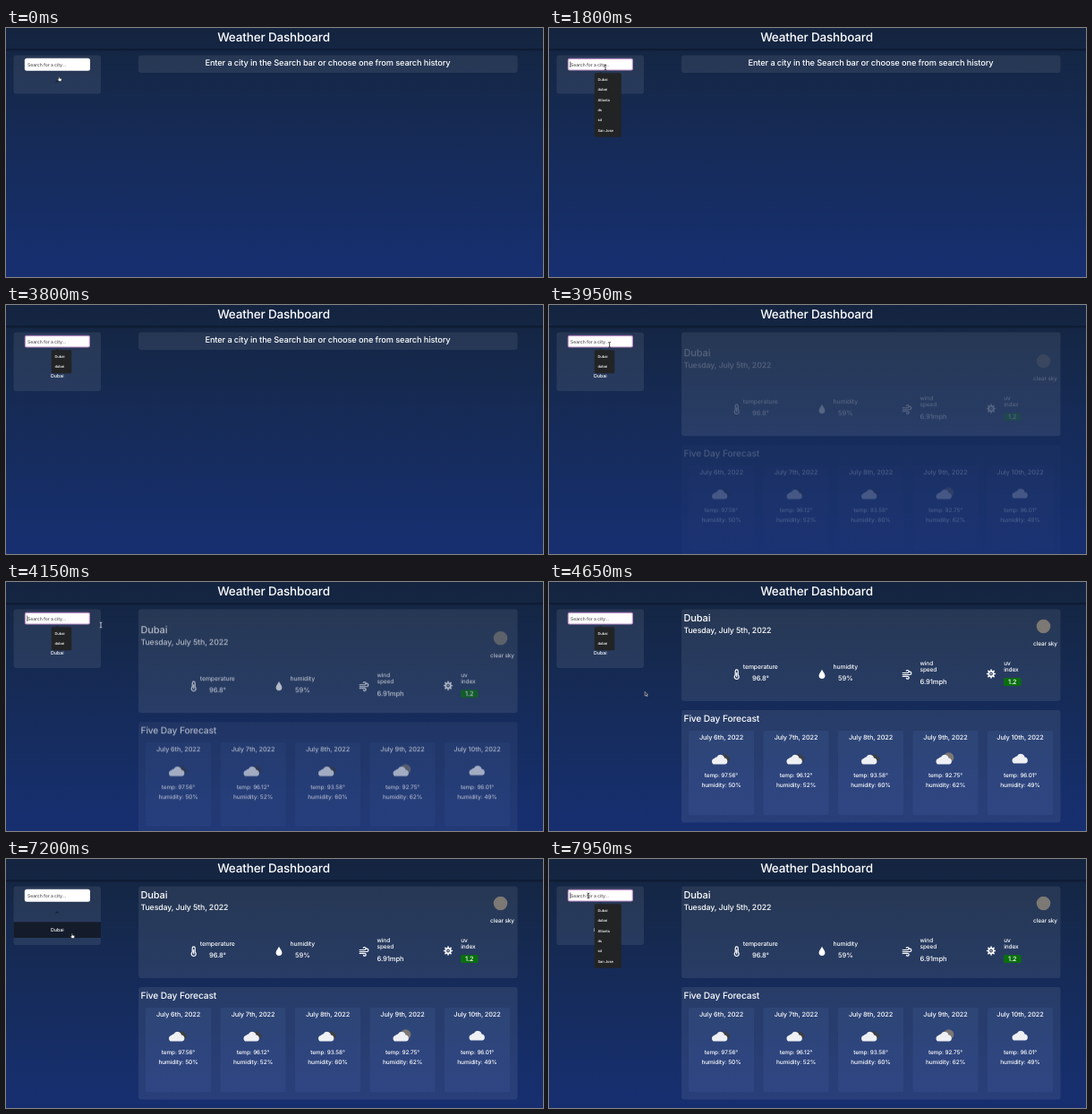
Write an HTML page that moves like this. It is 600 px wide and 278 px high and loops after 8000 ms.

```html
<!DOCTYPE html>
<html lang="en">
<head>
<meta charset="utf-8">
<title>Weather Dashboard</title>
<style>
html, body { margin: 0; width: 100%; height: 100%; overflow: hidden; background: #14264a; }
svg { display: block; width: 100vw; height: 100vh; }
text {
  font: 500 1px Inter, "Open Sans", sans-serif; letter-spacing: -.012em;
  fill: #fff; text-rendering: geometricPrecision;
}
.panel { fill: #fff; fill-opacity: .08; }
.card { fill: #6c90e0; fill-opacity: .09; }
</style>
</head>
<body>
<svg id="stage" viewBox="0 0 600 278" preserveAspectRatio="none"></svg>
<script>
const LOOP = 8000;
const text = (x, y, size, str, anchor = 'start', extra = '') =>
  `<text x="${x}" y="${y}" style="font-size:${size}px" text-anchor="${anchor}" ${extra}>${str}</text>`;
const mid = (x, y, size, str, extra) => text(x, y, size, str, 'middle', extra);
const rect = (x, y, w, h, r, attrs) =>
  `<rect x="${x}" y="${y}" width="${w}" height="${h}" rx="${r}" ${attrs}/>`;

const cloud = 'M-6 5.6A3.4 3.4 0 0 1 -6.3 -1.1A3 3 0 0 1 -3.6 -2.6A4.6 4.6 0 0 1 5 -1.6A3.7 3.7 0 0 1 5.8 5.6z';

const days = [
  ['6th', '97.56', 50, 'dark'], ['7th', '96.12', 52, 'dark'], ['8th', '93.58', 60, 'dark'],
  ['9th', '92.75', 62, 'sun'], ['10th', '96.01', 49, '']
];
const behind = {
  dark: `<path d="${cloud}" transform="translate(5 -1.9) scale(.75)" fill="#3d3f43"/>`,
  sun: '<circle cx="5" cy="-2" r="5.8" fill="#7c7874"/>',
  '': ''
};
const day = ([date, temp, hum, back], i) => {
  const x = 192.5 + i * 83.5;
  return rect(x - 36.5, 166, 73, 94, 2, 'class="card"') +
    mid(x, 176, 7.3, `July ${date}, 2022`) +
    `<g transform="translate(${x - (back ? 1.5 : 0)} ${back ? 198 : 197})">${behind[back]}<path d="${cloud}" fill="#eef0f4"/></g>` +
    mid(x, 218.3, 6.35, `temp: ${temp}°`) + mid(x, 228.5, 6.5, `humidity: ${hum}%`);
};

const rays = Array.from({ length: 8 }, (_, i) =>
  `<path d="M0 -3V-4.4" transform="rotate(${i * 45})"/>`).join('');
const icons = `<g fill="none" stroke="#fff" stroke-width="1.2" stroke-linecap="round">
  <g transform="translate(209.7 103)"><path d="M-1.5 1V-3.6a1.5 1.5 0 0 1 3 0V1a2.5 2.5 0 1 1 -3 0z"/>
    <path d="M0 -1.5V2.8"/></g>
  <path d="M305 97.8C306 100.5 308.4 102.2 308.4 104.6a3.4 3.4 0 0 1 -6.8 0C301.6 102.2 304 100.5 305 97.8z" fill="#fff" stroke="none"/>
  <g transform="translate(400 103)"><path d="M-4.8 -1.5H.6a1.5 1.5 0 1 0 -1.4 -2.2M-4.8 .5H3.2a1.7 1.7 0 1 0 -1.5 -2.6M-4.8 2.4H.8a1.4 1.4 0 1 1 -1.3 2"/></g>
  <g transform="translate(494 102.5)" stroke-width="1.6"><circle r="2.7"/>${rays}<circle r=".8" fill="#fff" stroke="none"/></g>
</g>`;

const weather = text(150.5, 43.6, 11, 'Dubai') + text(150.5, 56.6, 8.75, 'Tuesday, July 5th, 2022') +
  '<circle cx="552.5" cy="49.5" r="7.8" fill="#7c7874"/>' + mid(554.5, 71.4, 6.4, 'clear sky') + icons +
  mid(236.3, 96.5, 6.8, 'temperature') + mid(236.5, 110, 7.5, '96.8°') +
  mid(331.3, 96.5, 6.8, 'humidity') + mid(331.3, 110, 7.5, '59%') +
  text(414.5, 93, 6.5, 'wind') + text(414.5, 100, 6.5, 'speed') + text(414.5, 113.7, 7.6, '6.91mph') +
  text(508.2, 93, 6.5, 'uv') + text(508.2, 100, 6.5, 'index') +
  rect(508, 107, 19.5, 9, 1.5, 'fill="#0a6e0f"') + mid(517.7, 114.1, 7.3, '1.2') +
  rect(148, 143, 423.5, 125.5, 3, 'class="panel"') +
  text(150.5, 156, 10.2, 'Five Day Forecast') + days.map(day).join('');

const stage = document.getElementById('stage');
stage.innerHTML = `<defs><linearGradient id="sky" x2="0" y2="1">
    <stop stop-color="#14243f"/><stop offset=".2" stop-color="#15284a"/><stop offset=".8" stop-color="#162e68"/><stop offset="1" stop-color="#172f70"/>
  </linearGradient></defs>` +
  rect(0, 0, 600, 278, 0, 'fill="url(#sky)"') +
  rect(0, 23.3, 600, 1.2, 0, 'fill="#0c172b"') + rect(0, 24.5, 600, 1.5, 0, 'fill="#0c172b" opacity=".3"') +
  mid(299, 14.5, 13.5, 'Weather Dashboard') +
  rect(148, 30.5, 423.5, 19.5, 3, 'id="main" class="panel"') +
  mid(359.5, 42.3, 9.24, 'Enter a city in the Search bar or choose one from search history', 'id="message"') +
  `<g id="weather">${weather}</g>` +
  rect(8.5, 30.5, 97.5, 43, 3, 'id="side" class="panel"') +
  rect(8.5, 70.3, 97.5, 17.7, 0, 'id="hover" fill="#141c2b"') +
  mid(57.3, 80.8, 5.3, 'Dubai', 'id="past"') +
  '<path d="M55.5 60.6L57.3 59L59.1 60.6" fill="none" stroke="#0e1626" stroke-width=".9"/>' +
  rect(20.8, 33.8, 73.2, 14, 2.5, 'id="box" fill="#fff"') +
  rect(21.4, 34.4, 72, 12.6, 1.5, 'id="ring" fill="#fff" stroke="#b98cc4" stroke-width="1.2"') +
  text(24, 42.5, 5.1, '', 'start', 'id="field"') +
  rect(23.5, 37.5, .7, 6.5, 0, 'id="caret" fill="#222"') +
  `<g id="list"></g>
  <g id="cursor">
    <path id="beam" d="M-1.3 -3Q0 -3 0 -2V2Q0 3 -1.3 3M1.3 -3Q0 -3 0 -2M0 2Q0 3 1.3 3" fill="none" stroke="#222" stroke-width=".8"/>
    <path id="arrow" d="M-1.4 -2.6V2L-.3 1.1L.5 2.7L1.2 2.4L.5 .9H1.9z" fill="#111" stroke="#fff" stroke-width=".5"/>
    <path id="hand" d="M-1.2 -2.6Q-.5 -3.1 -.2 -2.4V-.9L1.8 -.5Q2.4 -.3 2.2 .6L1.6 2.6H-.9L-2.4 .5Q-2.2 -.2 -1.2 .3z" fill="#fff" stroke="#111" stroke-width=".5"/>
  </g>`;

const el = Object.fromEntries([...stage.querySelectorAll('[id]')].map(e => [e.id, e]));
const set = (e, attrs) => { for (const k in attrs) e.setAttribute(k, attrs[k]); };
const show = (e, on) => { e.style.display = on ? '' : 'none'; };
const ramp = (t, a, b) => Math.min(1, Math.max(0, (t - a) / (b - a)));
const ease = p => p * p * (3 - 2 * p);

// time, x, y
const path = [
  [0, 60, 57], [150, 60, 57], [450, 63, 44], [3900, 63, 44], [4150, 106, 48], [4800, 109, 137],
  [5850, 109, 137], [6150, 100, 119], [6300, 100, 119], [6550, 92, 107], [6700, 92, 107],
  [6950, 74.5, 86], [7220, 74.5, 86], [7500, 62, 60], [7700, 44, 41], [LOOP, 44, 41]
];
const pointer = t => {
  const i = path.findIndex(p => p[0] > t);
  const [t0, x0, y0] = path[i - 1], [t1, x1, y1] = path[i];
  const p = ease(ramp(t, t0, t1));
  return [x0 + (x1 - x0) * p, y0 + (y1 - y0) * p];
};

const CITY = 'Dubai', TYPE = 2000, ENTER = 3100, LOADED = 3850;
const cities = ['Dubai', 'dubai', 'Atlanta', 'ds', 'sd', 'San Jose'];

function suggest(t, typed) {
  if (t >= 7750 || (t >= 600 && t < TYPE)) return cities;
  if (t >= TYPE && t < 4850)
    return cities.filter(c => c.toLowerCase().startsWith(typed.length === 1 ? 'd' : 'du'));
  return [];
}

let listed = '';
function drawList(items) {
  if (items.join() === listed) return;
  listed = items.join();
  const w = items.length > 3 ? 30 : 22.5;
  el.list.innerHTML = !items.length ? '' :
    '<path d="M56 50.5L57.5 48.8L59 50.5z" fill="#222325"/>' +
    rect(50.8, 50.3, w, items.length * 11.35 + 3.3, 1.5, 'fill="#222325"') +
    items.map((c, i) => text(54.4, 59 + i * 11.35, 4.1, c)).join('');
}

function draw(t) {
  const typed = t >= TYPE && t < ENTER ? CITY.slice(0, 1 + Math.floor((t - TYPE) / 130)) : '';
  const saved = t >= ENTER;
  const focus = (t >= 550 && t < 5200) || t >= 7700;
  const start = t >= 7700 ? 7700 : t >= ENTER ? ENTER : 600;

  const drop = 13.2 * (1 - ease(ramp(t, 4170, 4300)));
  show(el.message, t < LOADED);
  set(el.main, { height: t < LOADED ? 19.5 : 102.5 + drop });
  set(el.weather, { opacity: ramp(t, LOADED, 4310), transform: `translate(0 ${drop})` });

  set(el.side, { height: saved ? 65.5 : 43 });
  show(el.past, saved);
  set(el.hover, { opacity: ramp(t, 6800, 7000) * (1 - ramp(t, 7370, 7490)) });
  show(el.box, !focus);
  show(el.ring, focus);
  el.field.textContent = typed || 'Search for a city...';
  el.field.style.fill = typed ? '#222' : '#555';
  show(el.caret, focus && !typed && (t - start) % 1000 < 500);
  drawList(suggest(t, typed));

  const [x, y] = pointer(t);
  const inBox = y < 48.5 && (x < 94 || t < 4250);
  const onLink = x < 106 && ((y > 54 && y < 64) || (t > 6700 && y > 70 && y < 89));
  set(el.cursor, { transform: `translate(${x} ${y})` });
  show(el.cursor, t < TYPE || t >= 3900);
  show(el.beam, inBox);
  set(el.beam, { stroke: x > 94 ? '#dde' : '#222' });
  show(el.hand, !inBox && onLink);
  show(el.arrow, !inBox && !onLink);
}

const begin = performance.now();
function tick() {
  draw((performance.now() - begin) % LOOP);
  requestAnimationFrame(tick);
}
tick();
</script>
</body>
</html>
```
